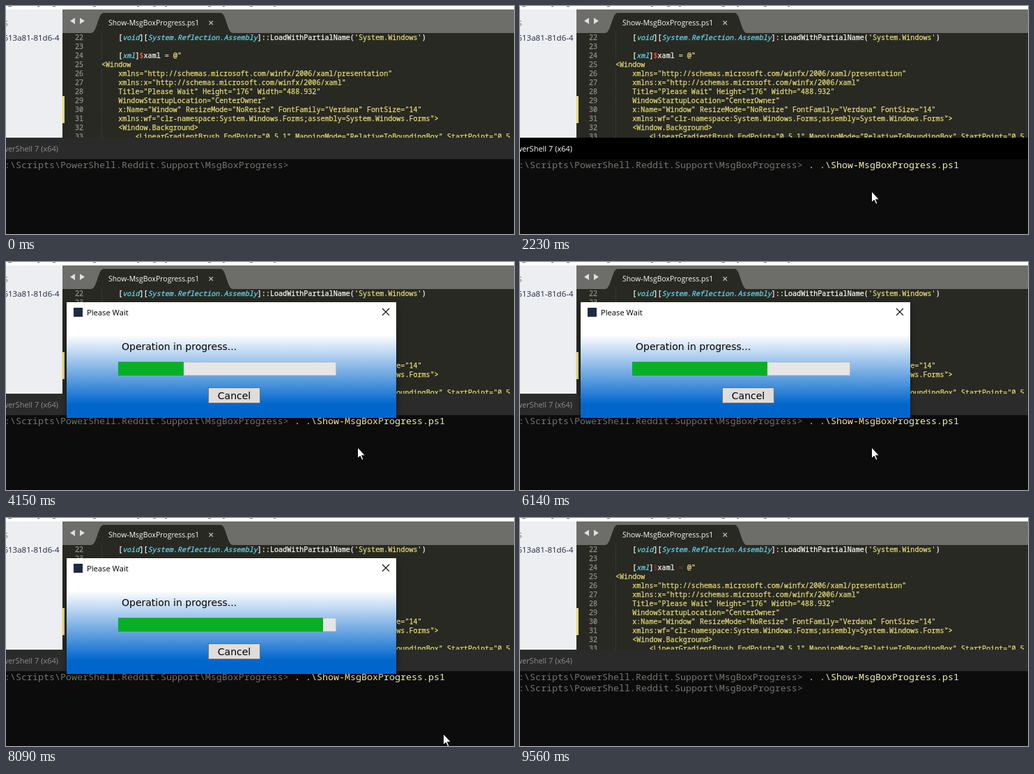
Animation, 729 px wide and 329 px high, one loop 9.65 s. Source, as an HTML page:

```html
<!DOCTYPE html>
<html lang="en">
<head>
<meta charset="utf-8">
<title>Message box progress</title>
<style>
  html, body { margin: 0; width: 100%; height: 100%; overflow: hidden; background: #0c0c0c; }
  svg { display: block; }
  text { white-space: pre; }
  .ui { font-family: "Open Sans", sans-serif; }
  .dialog-text { font: 14px "DejaVu Sans", sans-serif; }
  .code { font: 10.08px "Noto Sans Mono", monospace; color: #e6db74; }
  .code text, .code tspan { fill: currentColor; stroke: currentColor; stroke-width: .25px; }
  .code .plain { color: #f8f8f2; }
  .code .type { color: #66d9ef; font-style: italic; }
  .code .number { color: #90908a; }
  .console { font: 13.33px "Noto Sans Mono", monospace; fill: #767370; }
</style>
</head>
<body>
<svg width="729" height="329" viewBox="0 0 729 329">
  <defs>
    <linearGradient id="sky" x1="0" y1="0" x2="0" y2="1">
      <stop offset=".13" stop-color="#fff"/>
      <stop offset=".86" stop-color="#06c"/>
    </linearGradient>
    <filter id="blur" x="-10%" y="-20%" width="120%" height="140%">
      <feGaussianBlur stdDeviation="5"/>
    </filter>
  </defs>

  <!-- side panel and top strip -->
  <rect width="729" height="191" fill="#eceef1"/>
  <rect width="729" height="5" fill="#fff"/>
  <path d="M3 .5h5M45 .5h3M67 .5h4M125 .5h4M188 .5h3M211 .5h4M228 .5h3M290 .5h4M311 .5h3M350 .5h4M384 .5h3" stroke="#777"/>
  <g class="ui">
    <text x="3" y="29" font-size="14" text-anchor="end" fill="#8a8a8a">s</text>
    <text x="76.500" y="50" font-size="11.500" text-anchor="end" fill="#1c2a48">613a81-81d6-4</text>
  </g>

  <!-- editor -->
  <rect x="81" y="5" width="648" height="34" fill="#6d6e69"/>
  <rect x="81" y="39" width="648" height="151" fill="#282923"/>
  <path d="M123 39C131 37 132 10 140 10H308C316 10 317 37 325 39Z" fill="#282923"/>
  <path d="M99 17v9l-7-4.500zM106 17v9l7-4.500z" fill="#e0e0dc"/>
  <text class="ui" x="147" y="28" font-size="10.430" fill="#f8f8f4">Show-MsgBoxProgress.ps1</text>
  <path d="M291.500 21.500l5.500 5.500m0-5.500l-5.500 5.500" stroke="#b8b8b4" stroke-width="1.300"/>
  <rect x="81" y="130" width="3" height="39" fill="#e6db74"/>
  <path d="M137.500 39v38M137.500 91v99" stroke="#4a4b44" stroke-dasharray="1 1"/>
  <g id="code" class="code"></g>

  <!-- console -->
  <rect y="190" width="729" height="139" fill="#0c0c0c"/>
  <rect id="titleBar" y="190" width="729" height="31"/>
  <text id="title" class="ui" x="75" y="210" font-size="11" text-anchor="end">PowerShell 7 (x64)</text>
  <g class="console">
    <text x="-34" y="234">PS C:\Scripts\PowerShell.Reddit.Support\MsgBoxProgress&gt;</text>
    <text x="414" y="234" id="command" fill="#f5edb5"></text>
    <text id="nextPrompt" x="-34" y="250">PS C:\Scripts\PowerShell.Reddit.Support\MsgBoxProgress&gt;</text>
  </g>

  <!-- dialog -->
  <g id="dialog">
    <rect x="87" y="62" width="473" height="163" opacity=".4" filter="url(#blur)"/>
    <rect x="87" y="58" width="473" height="30" fill="#fff"/>
    <rect x="87" y="87" width="473" height="138" fill="url(#sky)"/>
    <rect x="97" y="66" width="13" height="13" fill="#1d2b45"/>
    <text class="ui" x="116" y="77" font-size="11.200">Please Wait</text>
    <path d="M540 67l10 10m0-10l-10 10" stroke="#111" stroke-width="1.100"/>
    <text class="dialog-text" x="166" y="127">Operation in progress...</text>
    <rect x="161.500" y="144.500" width="312" height="19" fill="#e6e6e6" stroke="#bcbcbc"/>
    <rect id="bar" x="161" y="144" height="20" fill="#06b025"/>
    <rect x="290.500" y="181.500" width="74" height="22" fill="#ddd" stroke="#707070"/>
    <text class="dialog-text" x="327.500" y="198" text-anchor="middle">Cancel</text>
  </g>

  <path id="pointer" d="M.5.500V16.500L4.200 13 6.800 19 9 18 6.500 12.200H11.500Z" fill="#fff" stroke="#000"/>
</svg>
<script>
const LOOP = 9650;
const byId = id => document.getElementById(id);
const [code, titleBar, title, command, nextPrompt, dialog, bar, pointer] =
  ["code", "titleBar", "title", "command", "nextPrompt", "dialog", "bar", "pointer"].map(byId);

// Each line: indent level, then strings or [text, class] pairs.
const lines = [
  [1, ["[", "plain"], ["void", "type"], ["][", "plain"], ["System.Reflection.Assembly", "type"],
    ["]::LoadWithPartialName(", "plain"], "'System.Windows'", [")", "plain"]],
  [0],
  [1, ["[", "plain"], ["xml", "type"], ["]", "plain"], ["$", "sigil"], ["xaml ", "plain"], ["=", "equals"], ' @"'],
  [0, "<Window"],
  [1, 'xmlns="http://schemas.microsoft.com/winfx/2006/xaml/presentation"'],
  [1, 'xmlns:x="http://schemas.microsoft.com/winfx/2006/xaml"'],
  [1, 'Title="Please Wait" Height="176" Width="488.932"'],
  [1, 'WindowStartupLocation="CenterOwner"'],
  [1, 'x:Name="Window" ResizeMode="NoResize" FontFamily="Verdana" FontSize="14"'],
  [1, 'xmlns:wf="clr-namespace:System.Windows.Forms;assembly=System.Windows.Forms">'],
  [1, "<Window.Background>"],
  [2, '<LinearGradientBrush EndPoint="0.5,1" MappingMode="RelativeToBoundingBox" StartPoint="0.5,0">']
];

function addNode(parent, name, attributes, text = "") {
  const node = document.createElementNS("http://www.w3.org/2000/svg", name);
  for (const key in attributes) node.setAttribute(key, attributes[key]);
  node.textContent = text;
  return parent.appendChild(node);
}

lines.forEach(([indent, ...parts], i) => {
  const y = 49 + 13 * i;
  addNode(code, "text", { x: 111, y, class: "number", "text-anchor": "end" }, 22 + i);
  const row = addNode(code, "text", { x: 137 + 24.2 * indent, y });
  for (const part of parts) {
    const [text, kind] = [].concat(part);
    addNode(row, "tspan", { class: kind || "string" }, text);
  }
});
const sigil = document.querySelector(".sigil");
const equals = document.querySelector(".equals");

const typed = [[1390, ". ."], [1520, ". .\\"], [1910, ". .\\Show-MsgBoxProgress.ps1"]];
const barTimes = [2660, 3170, 3650, 4150, 4640, 5160, 5640, 6140, 6630, 7100, 7600, 8090];
const pointerPath = [[300, 650, 329], [930, 504, 267], [7400, 504, 267], [7670, 627, 311], [8840, 627, 311], [8960, 641, 330]];

function pointerAt(t) {
  const i = pointerPath.findIndex(point => point[0] > t);
  if (i < 1) return null;
  const [t0, x0, y0] = pointerPath[i - 1], [t1, x1, y1] = pointerPath[i];
  const k = (t - t0) / (t1 - t0), eased = k * k * (3 - 2 * k);
  return [x0 + (x1 - x0) * eased, y0 + (y1 - y0) * eased];
}

const show = (node, visible) => node.setAttribute("display", visible ? "inline" : "none");

function draw(t) {
  const dialogOpen = t >= 2300 && t < 8470;
  const active = t >= 900 && t < 9530 && !dialogOpen;
  titleBar.setAttribute("fill", active ? "#000" : "#2b2b2b");
  title.setAttribute("fill", active ? "#fff" : "#8c8c8c");
  sigil.style.color = t < 2300 ? "#f0562f" : "#8a2c3e";
  equals.style.color = t < 2300 ? "#e4dcc0" : "#8a2c3e";

  command.textContent = typed.filter(([at]) => at <= t).map(([, text]) => text).pop() || "";
  show(nextPrompt, t >= 8540);

  show(dialog, dialogOpen);
  const steps = barTimes.filter(at => at <= t).length;
  bar.setAttribute("width", steps && 25 * steps - 6);

  const tip = pointerAt(t);
  show(pointer, tip);
  if (tip) pointer.setAttribute("transform", `translate(${tip.map(Math.round)})`);
}

function frame() {
  draw(performance.now() % LOOP);
  requestAnimationFrame(frame);
}
frame();
</script>
</body>
</html>
```
